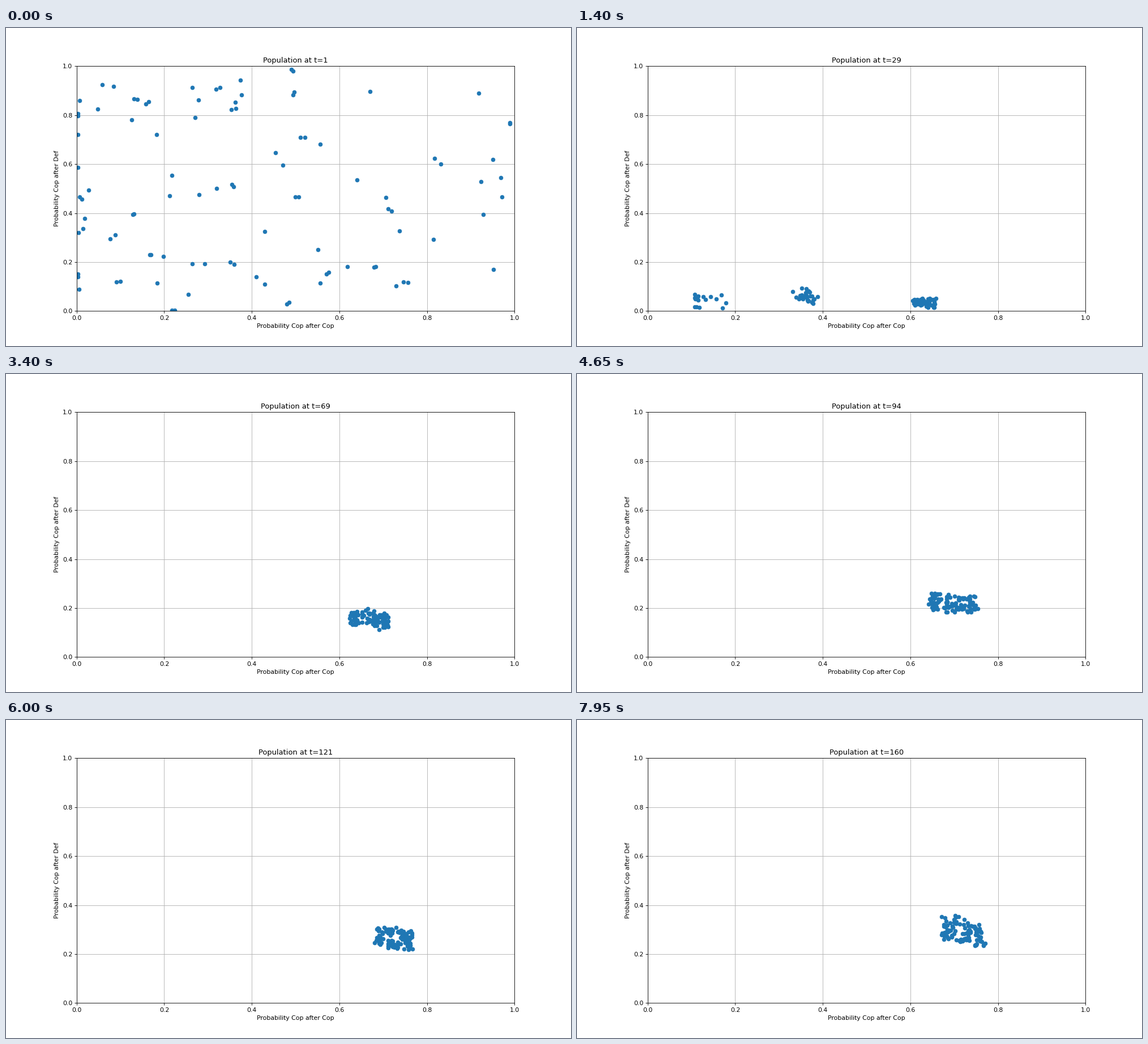
Animation of 998x561 px, one loop 8 s. Source, as a matplotlib script:

```python
import numpy as np
import matplotlib.pyplot as plt
from matplotlib.animation import FuncAnimation

STEPS = 160
SIZE = 100
FOUNDERS = 77
LEFT, MIDDLE = 16, 48      # slots below these numbers breed in dying groups
DPI = 78
rng = np.random.default_rng(7)

# Surviving cloud: step, centre x, centre y, half width, half height
DRIFT = np.array([
    (28, 0.635, 0.030, 0.028, 0.022),
    (68, 0.675, 0.153, 0.047, 0.033),
    (93, 0.702, 0.218, 0.056, 0.045),
    (120, 0.730, 0.260, 0.042, 0.050),
    (144, 0.738, 0.282, 0.046, 0.070),
    (159, 0.722, 0.290, 0.050, 0.066),
])

# Evenly scattered family centres inside the cloud, from -1 to 1
n = np.arange(1, 27)[:, None]
families = 2 * (n * [0.7549, 0.5698] % 1) - 1


def left_group():
    return np.array([0.108 + 0.09 * rng.random() ** 3, rng.uniform(0.01, 0.07)])


def middle_group():
    return rng.normal((0.362, 0.055), (0.013, 0.016))


def survivors(step):
    cx, cy, w, h = (np.interp(step, DRIFT[:, 0], col) for col in DRIFT[:, 1:].T)
    u, v = rng.choice(families) + rng.uniform(-0.18, 0.18, 2)
    return np.array([cx + w * u, cy + h * (0.8 * v - 0.3 * u)])


def born(slot, step, life):
    if step >= group_end[slot]:
        p = survivors(step + life / 2)
    elif slot < LEFT:
        p = left_group()
    else:
        p = middle_group()
    early = max(0, 1 - step / 16)
    p = p + early * np.array([rng.normal(0, 0.08), rng.uniform(0, 0.35)])
    return np.clip(p, 0.005, 0.995)


# First generation: random founders, crowded to the left, and close children
start = rng.random((FOUNDERS, 2)) ** [1.5, 1.15]
children = start[:SIZE - FOUNDERS] + rng.uniform(-0.011, 0.011, (SIZE - FOUNDERS, 2))
start = np.clip(np.vstack([start, children]), 0.003, 0.99)

# High, cooperative strategies are replaced first
order = np.argsort(-start @ [0.3, 1])
first_death = np.empty(SIZE, int)
first_death[order] = 1 + np.arange(SIZE) * 16 // SIZE

slots = rng.permutation(SIZE)
group_end = np.zeros(SIZE, int)
group_end[:LEFT] = rng.integers(30, 35, LEFT)
group_end[LEFT:MIDDLE] = np.linspace(36, 54, MIDDLE - LEFT)

history = np.empty((STEPS, SIZE, 2))
for i, slot in enumerate(slots):
    step, end, p = 0, first_death[i], start[i]
    while step < STEPS:
        history[step:end, i] = p
        step = end
        life = int(rng.integers(5, 12))
        p = born(slot, step, life)
        end = step + life
        if step < group_end[slot]:
            end = min(end, group_end[slot])

fig, ax = plt.subplots(figsize=(998.001 / DPI, 561.001 / DPI), dpi=DPI)
dots = ax.scatter(*start.T)
ax.set(xlim=(0, 1), ylim=(0, 1), xlabel="Probability Cop after Cop",
       ylabel="Probability Cop after Def")
ax.grid(True)
ax.set_axisbelow(True)
title = ax.set_title("Population at t=1")


def draw(step):
    dots.set_offsets(history[step])
    title.set_text(f"Population at t={step + 1}")
    return dots, title


anim = FuncAnimation(fig, draw, frames=STEPS, interval=50,
                     init_func=lambda: draw(0), repeat=True, repeat_delay=0)
plt.show()
```
